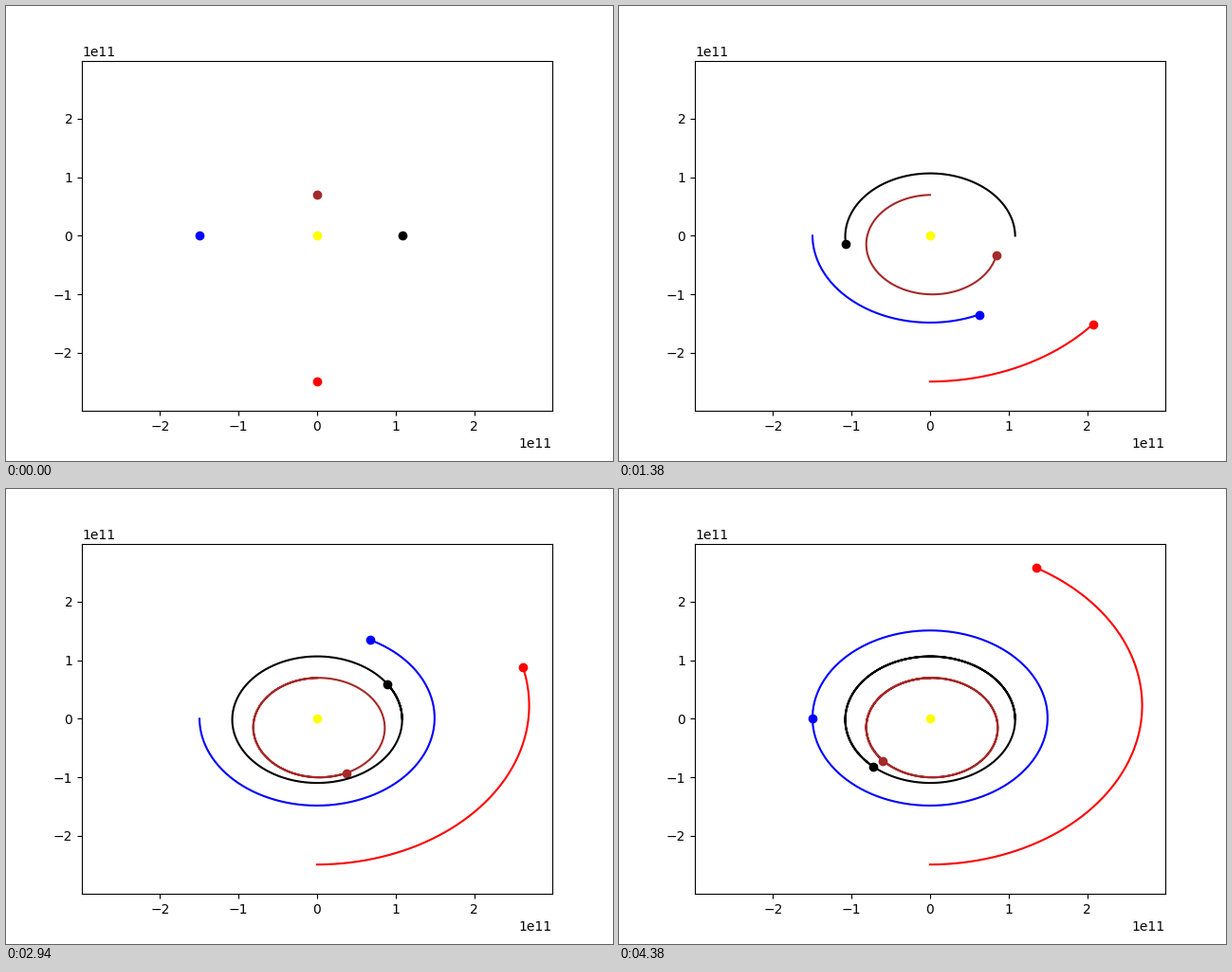
These frames come from a looping animation (640x480 px, 4440 ms). A matplotlib script:

```python
import numpy as np
import matplotlib.pyplot as plt
from matplotlib.animation import FuncAnimation

GM = 6.674e-11 * 1.989e30
AU = 149.6e9
DAY = 86400.0
FRAMES = 74
DAYS_PER_FRAME = 5
INTERVAL = 60

# colour, start position (m), start velocity (m/s)
PLANETS = [
    ("brown", (0, 69.82e9), (-47.31e3, 0)),
    ("black", (108.2e9, 0), (0, 35.0e3)),
    ("blue", (-AU, 0), (0, -29.78e3)),
    ("red", (0, -249e9), (24.04e3, 0)),
]


def orbit(position, velocity, days):
    """Daily positions, integrated with semi-implicit Euler steps."""
    pos = np.array(position, float)
    vel = np.array(velocity, float)
    path = [pos.copy()]
    for _ in range(days):
        vel -= GM * pos / np.hypot(*pos) ** 3 * DAY
        pos += vel * DAY
        path.append(pos.copy())
    return np.array(path)


fig, ax = plt.subplots(figsize=(6.4, 4.8), dpi=100)
ax.set_xlim(-2 * AU, 2 * AU)
ax.set_ylim(-2 * AU, 2 * AU)
ax.plot([0], [0], "o", color="yellow")

bodies = []
for color, position, velocity in PLANETS:
    path = orbit(position, velocity, (FRAMES - 1) * DAYS_PER_FRAME)
    trail, = ax.plot([], [], "-", color=color)
    dot, = ax.plot([], [], "o", color=color)
    bodies.append((path, trail, dot))


def update(frame):
    day = frame * DAYS_PER_FRAME
    for path, trail, dot in bodies:
        trail.set_data(path[:day + 1, 0], path[:day + 1, 1])
        dot.set_data(path[day:day + 1, 0], path[day:day + 1, 1])
    return [artist for body in bodies for artist in body[1:]]


anim = FuncAnimation(fig, update, frames=FRAMES, interval=INTERVAL,
                     repeat=True, repeat_delay=0)
plt.show()
```
